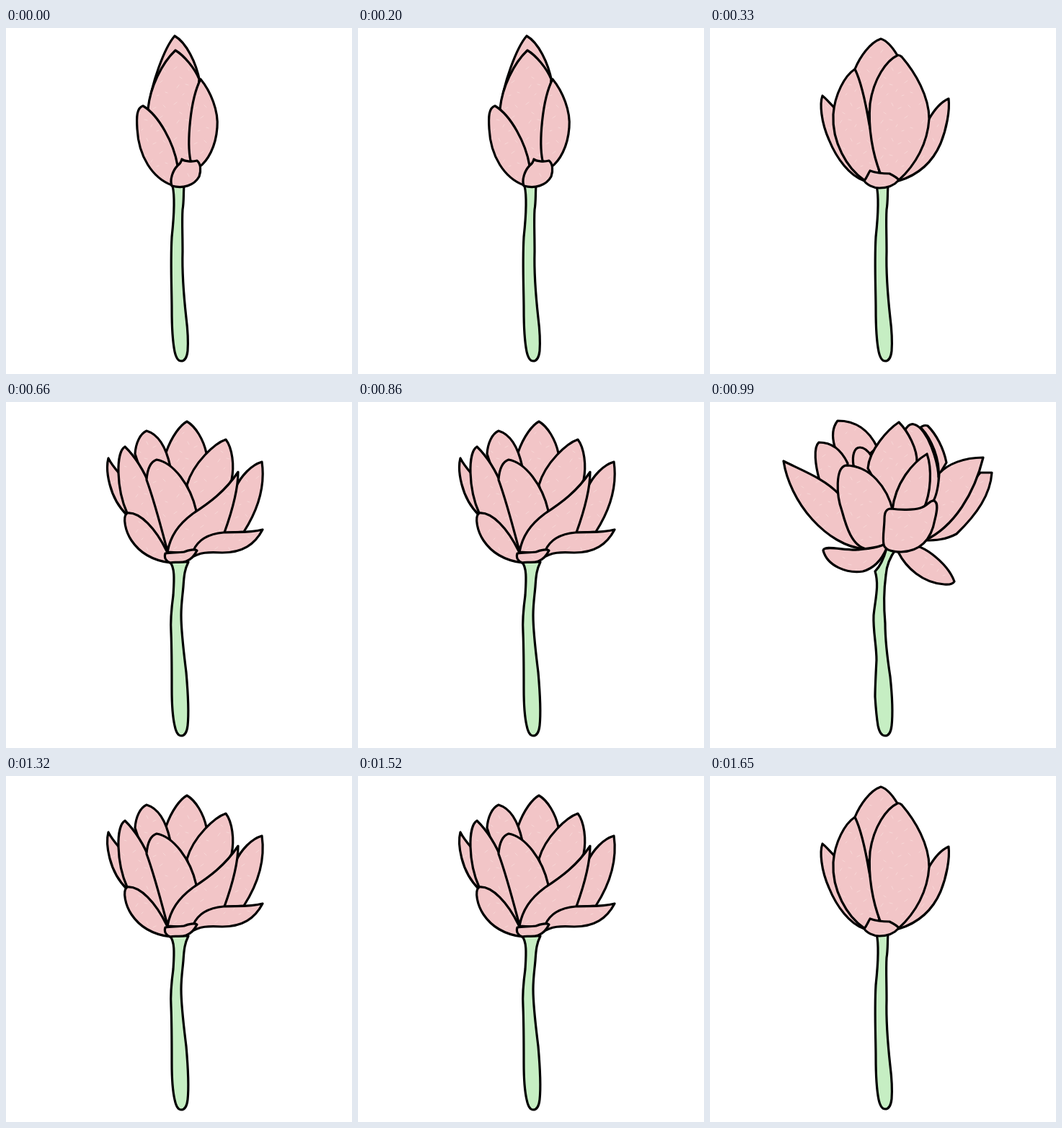
These frames come from a looping animation (480x480 px, 1980 ms). An HTML page:

```html
<!DOCTYPE html>
<html lang="en">
<head>
<meta charset="utf-8">
<title>Opening lotus</title>
<style>
  html, body { margin: 0; width: 100%; height: 100%; overflow: hidden; background: #fff; }
  svg { display: block; width: 100vw; height: 100vh; }
  path { stroke: #000; stroke-width: 3.2; stroke-linejoin: round; stroke-linecap: round; }
  .petals path { fill: url(#pink); }
  .stem { fill: #c6eec3; }
  #flecks path { fill: none; stroke: #f7d8d7; stroke-width: .9; }

  .pose { visibility: hidden; animation: 1980ms step-end infinite; }
  .bud { animation-name: bud; }
  .tulip { animation-name: tulip; }
  .half { animation-name: half; }
  .open { animation-name: open; }
  @keyframes bud { 0% { visibility: visible } 16.66%, 100% { visibility: hidden } }
  @keyframes tulip {
    0%, 33.33% { visibility: hidden }
    16.66%, 83.33%, 100% { visibility: visible }
  }
  @keyframes half {
    0%, 49.99%, 83.33%, 100% { visibility: hidden }
    33.33%, 66.66% { visibility: visible }
  }
  @keyframes open {
    0%, 66.66%, 100% { visibility: hidden }
    49.99% { visibility: visible }
  }
</style>
</head>
<body>
<svg viewBox="0 0 480 480">
  <defs>
    <pattern id="pink" width="57" height="49" patternUnits="userSpaceOnUse">
      <rect width="57" height="49" fill="#f2c5c7"/>
      <g id="flecks">
        <path d="M5 8l4-3M13 19l3 2M24 6l2 4M33 14l4-2M47 9l3 3M9 34l3-4M21 29l4 1M30 39l2-3M42 27l4-3M50 40l3 1M17 44l2-2M38 45l3-1"/>
      </g>
    </pattern>
    <path id="straight" class="stem" d="M231 219C235 236 233 262 230 290C228 325 230 365 230 390C230 412 231 434 234 449C236 458 239 462 243 462C248 462 251 457 252 448C253 434 252 418 250 402C247 375 244 345 245 310C245 285 244 268 245 252C247 240 246 230 247 219Z"/>
  </defs>

  <!-- closed bud -->
  <g class="pose bud">
    <use href="#straight"/>
    <g class="petals">
      <path d="M198 112C201 78 220 27 234 11C250 20 264 48 269 75Z"/>
      <path d="M235 31C216 49 200 82 197 112L238 192L258 185L268 71C262 56 247 38 235 31Z"/>
      <path d="M270 71C284 88 295 115 293 138C291 165 280 184 268 193L256 184C251 160 255 100 270 71Z"/>
      <path d="M190 108C181 111 181 124 182 140C184 178 203 208 230 218L238 191C233 160 212 121 190 108Z"/>
      <path d="M244 182C247 185 258 186 265 184C270 188 271 197 268 206C261 219 245 223 230 219C227 211 231 198 238 191C242 188 243 186 244 182Z"/>
    </g>
  </g>

  <!-- first petals loosen -->
  <g class="pose tulip">
    <use href="#straight"/>
    <g class="petals">
      <path d="M156 94C152 105 154 130 165 155C176 182 194 205 214 212L222 200L172 110C166 104 160 97 156 94Z"/>
      <path d="M331 98C322 102 312 112 304 126L262 212C288 204 308 188 320 160C328 140 333 115 331 98Z"/>
      <path d="M201 57C208 40 222 20 237 15C247 18 254 28 260 38L225 140Z"/>
      <path d="M201 57C187 66 173 92 171 120C169 158 190 195 214 211L235 200L221 134C217 110 210 75 201 57Z"/>
      <path d="M260 38C245 45 227 70 222 105C219 140 226 175 236 201L262 211C285 190 302 160 304 126C304 95 285 62 266 40Q263 37 260 38Z"/>
      <path d="M222 198C230 201 243 202 249 202C255 205 260 208 262 211C255 219 245 222 235 222C226 222 217 217 214 212C217 208 219 203 222 198Z"/>
    </g>
  </g>

  <!-- half open -->
  <g class="pose half">
    <path class="stem" d="M227 222C235 229 233 250 232 268C229 290 228 305 229 320C230 345 230 372 230 398C230 416 231 436 234 449C236 459 239 463 243 463C248 463 251 458 252 449C254 430 252 398 250 375C247 350 243 320 243 296C243 280 245 268 246 256C247 240 248 232 253 222Z"/>
    <g class="petals">
      <path d="M142 78C138 93 142 132 168 157L185 150L157 99C151 92 145 84 142 78Z"/>
      <path d="M251 27C242 32 230 47 222 70L230 130L265 150L278 71C274 52 263 34 251 27Z"/>
      <path d="M305 52C290 57 260 84 251 115L262 155L290 150L313 108C317 88 314 64 305 52Z"/>
      <path d="M195 40C186 44 180 57 179 72L205 150L228 90C222 62 212 45 195 40Z"/>
      <path d="M165 62C152 70 153 120 168 154L224 207C214 145 196 92 165 62Z"/>
      <path d="M209 80C200 83 196 94 195 108C206 138 215 173 224 207L264 151C256 115 232 84 209 80Z"/>
      <path d="M355 83C341 87 326 102 318 120L298 182L330 180C348 152 360 118 355 83Z"/>
      <path d="M322 97C304 124 282 140 259 155C239 170 228 186 224 208L258 210L303 181C312 156 322 125 322 97Z"/>
      <path d="M356 177C338 182 320 180 302 181C280 183 266 192 260 206L256 217C268 208 282 208 300 209C328 209 345 198 356 177Z"/>
      <path d="M168 154C161 160 166 180 174 192C186 210 204 220 228 223L223 207C208 176 186 152 168 154Z"/>
      <path d="M221 210C230 209 239 209 247 208C254 205 262 204 265 206C262 212 258 218 250 221C242 224 234 221 228 223C222 221 219 216 221 210Z"/>
    </g>
  </g>

  <!-- full bloom -->
  <g class="pose open">
    <path class="stem" d="M245 203C242 214 237 227 229 235C235 254 229 275 227 296C226 318 231 337 231 358C230 378 229 395 229 409C230 425 231 437 233 449C235 459 239 463 243 463C248 463 251 458 252 449C254 430 252 400 250 381C246 355 243 330 243 307C241 285 241 262 244 240C245 226 249 216 258 204Z"/>
    <g class="petals">
      <path d="M177 26C170 35 169 48 173 62L195 95L232 63C222 42 205 26 177 26Z"/>
      <path d="M290 37Q296 31 302 33C314 45 324 64 328 84L316 104Z"/>
      <path d="M270 40Q276 29 283 31C292 33 302 48 307 62C315 82 322 110 314 138L270 150Z"/>
      <path d="M293 36C308 52 319 80 317 104" fill="none" style="fill: none"/>
      <path d="M151 56C143 63 146 88 152 109L185 140L191 85C182 66 169 56 151 56Z"/>
      <path d="M102 82C106 108 120 139 142 163C162 185 188 202 215 204L190 150L179 128C160 107 128 95 102 82Z"/>
      <path d="M199 88C197 74 200 63 208 63C214 63 220 69 224 75L235 110Z"/>
      <path d="M262 28C247 38 221 66 219 92L252 150L280 140L287 84C288 66 275 41 262 28Z"/>
      <path d="M375 98L391 98C389 128 371 155 342 183C327 191 313 192 298 192Z"/>
      <path d="M379 77C352 77 330 86 318 99C317 115 314 130 310 137L298 192C339 173 367 126 379 77Z"/>
      <path d="M188 88C174 92 175 129 183 151C189 173 197 200 217 204C228 204 236 202 243 196L254 152C246 118 222 88 188 88Z"/>
      <path d="M301 72C281 84 257 112 253 150L296 149C307 126 308 92 301 72Z"/>
      <path d="M157 206C158 198 185 206 205 205C222 203 232 202 241 198L245 203C239 217 230 230 212 235C190 238 163 228 157 206Z"/>
      <path d="M261 208C272 230 295 251 325 253Q336 254 339 249C335 238 325 224 308 211C300 205 294 202 288 200Z"/>
      <path d="M242 162C242 152 245 148 251 148C264 150 282 150 292 147C302 144 305 136 311 137C317 140 315 151 312 163C307 191 292 207 265 208C251 208 243 205 241 198C239 187 242 174 242 162Z"/>
    </g>
  </g>
</svg>
</body>
</html>
```
